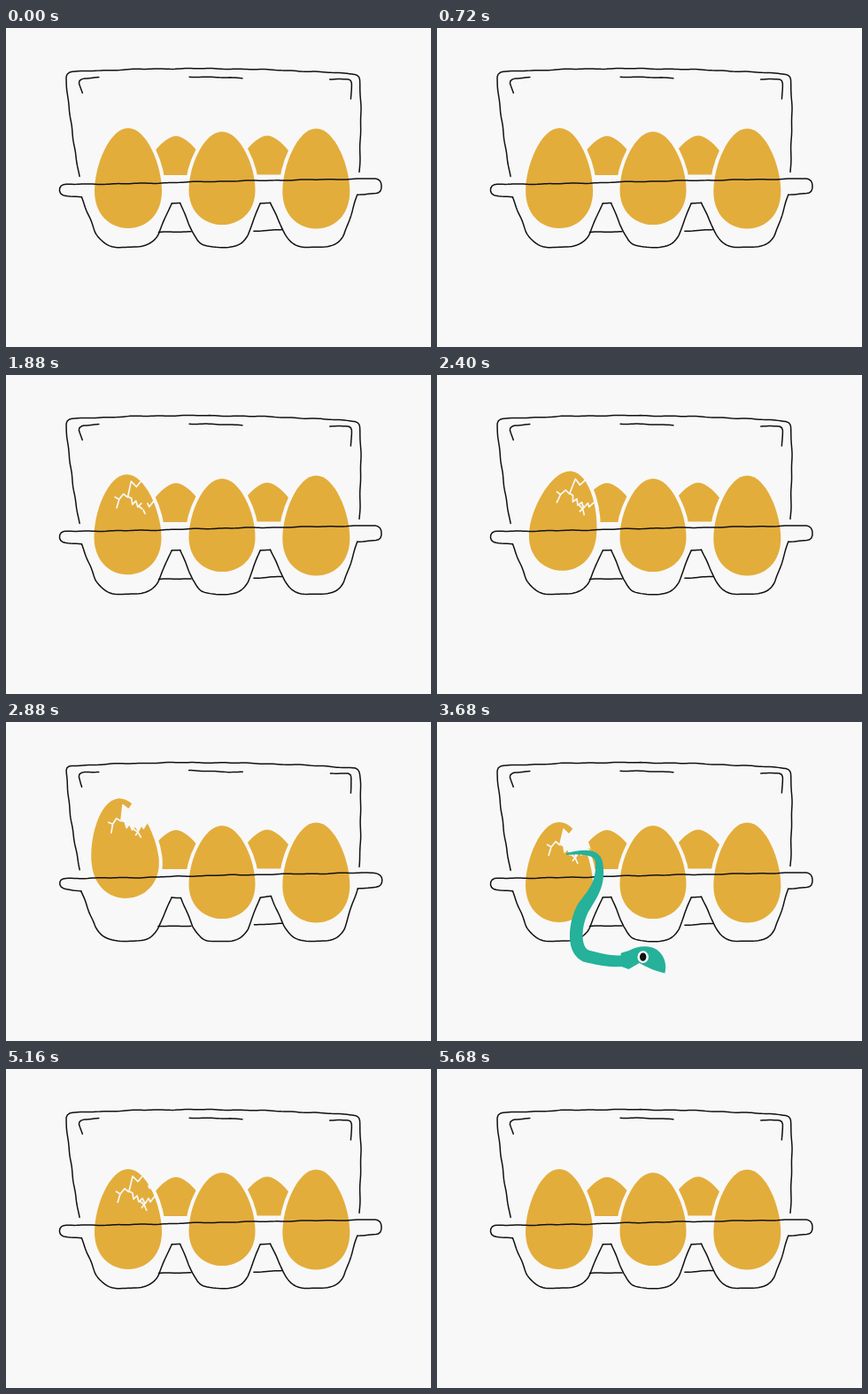
Animation, 480 px wide and 360 px high, one loop 5.76 s. Source, as an HTML page:

```html
<!DOCTYPE html>
<html lang="en">
<head>
<meta charset="utf-8">
<title>Egg carton</title>
<style>
  html, body { margin: 0; width: 100%; height: 100%; overflow: hidden; background: #f8f8f8; }
  svg { display: block; width: 100vw; height: 100vh; }
  .line { fill: none; stroke: #111; stroke-width: 1.5; stroke-linecap: round; stroke-linejoin: round; }
  .egg { fill: #e3ad3b; }
  .front { stroke: #f8f8f8; stroke-width: 8; paint-order: stroke; }
  .crack { fill: none; stroke: #f8f8f8; stroke-width: 1.7; stroke-linejoin: round; }
  .paper { fill: #f8f8f8; }
  .snake { fill: #25b19a; }
</style>
</head>
<body>
<svg viewBox="0 0 480 360">
  <defs>
    <path id="eggShape" d="M138 113C159 113 176 155 176 184C176 210 159 226 138 226C117 226 100 210 100 184C100 155 117 113 138 113Z"/>
    <path id="backShape" d="M156 166C156 150 178 122 192 122C206 122 228 150 228 166Z"/>
    <path id="route" d="M146 149C165 146 181 146 183 158C186 185 174 195 165 210C155 228 152 262 172 265C190 269 198 271 216 269C232 267 240 284 262 282S300 262 325 264S365 284 390 280S440 262 465 266S510 280 540 280H800"/>
  </defs>

  <path class="line" d="M83 167Q70 95 68 56Q68 50 74 49.5Q230 41 394 52Q399 53 399.5 58Q402 100 399 163"/>
  <path class="line" d="M105 56L88 57Q82 58 82.5 62L86 73"/>
  <path class="line" d="M207 55L267 56.5"/>
  <path class="line" d="M366 58H386Q390 58 390 63L389.5 80"/>
  <path class="line" d="M172 230.5L209 230"/>
  <path class="line" d="M280 229L312 227.5"/>

  <use href="#backShape" class="egg"/>
  <use href="#backShape" class="egg" x="103" y="-.5"/>
  <use href="#eggShape" class="egg front" transform="translate(244 117) scale(.987 .93) translate(-138 -113)"/>
  <use href="#eggShape" class="egg front" x="212.3" y=".4"/>
  <g id="hatching">
    <use href="#eggShape" class="egg front"/>
    <path id="hole" class="paper"/>
    <path id="mainCrack" class="crack" pathLength="1"/>
    <path id="sideCrack" class="crack" pathLength="1" d="M139 139L134 135L129 141L126 151M129 141L124 138"/>
    <path id="lowCrack" class="crack" pathLength="1" d="M151 149L156 153L153 157M156 153L159 160"/>
  </g>

  <path class="line" d="M85 191L68 189Q60 188 60.5 182Q61 176.5 69 176.5L150 175.5L240 173L416 170Q424 171 424.5 178Q425 186 418 186.5L397 188"/>
  <path class="line cup"/>
  <path class="line" d="M187 198H197"/>
  <path class="line cup"/>
  <path class="line" d="M287 198L299 197"/>
  <path class="line cup"/>

  <path id="chip" class="egg"/>
  <path id="body" class="snake"/>
  <g id="head">
    <path class="snake" d="M207 261L216 258C226 252 240 251 248 257C257 264 259 274 257 283C246 281 235 276 228 272L216 279L207 276Z"/>
    <ellipse cx="232" cy="265" rx="6.3" ry="6.8" class="paper"/>
    <ellipse cx="232" cy="265" rx="3.7" ry="4.7" fill="#111"/>
  </g>
</svg>
<script>
const LOOP = 5760, POSE_MS = 160, NECK = 207;
const $ = id => document.getElementById(id);
const ramp = (t, from, to) => Math.max(0, Math.min(1, (t - from) / (to - from)));
const bump = (t, from, to) => Math.sin(Math.PI * ramp(t, from, to)) ** 2;
const show = (el, on) => el.setAttribute('visibility', on ? 'visible' : 'hidden');
const transform = (el, value) => el.setAttribute('transform', value);

const cup = (x1, y1, x2, y2) => {
  const inset = (x2 - x1) * .155, mid = (x1 + x2) / 2;
  return `M${x1} ${y1}L${x1 + inset} 231C${x1 + inset * 1.6} 246 ${mid - 18} 247.5 ${mid} 247.5`
    + `S${x2 - inset * 1.5} 246 ${x2 - inset} 234L${x2} ${y2}`;
};
const cupShapes = [cup(85, 191, 187, 198), cup(197, 198, 287, 198), cup(299, 197, 397, 188)];
document.querySelectorAll('.cup').forEach((el, i) => el.setAttribute('d', cupShapes[i]));

const holeEdge = 'M154 121L149 127L143 121L139 138L143 140L144 147L148 143L150 150L154 146L157 152L161 146L163 150L170 141';
$('hole').setAttribute('d', holeEdge + 'L174 144Q169 126 156 117Z');
$('mainCrack').setAttribute('d', holeEdge);
$('chip').setAttribute('d', holeEdge + 'Q165 130 154 121Z');

// Each ink line is sampled once, then redrawn with a slight wobble in every pose.
const inkLines = [...document.querySelectorAll('.line')].map(el => {
  const length = el.getTotalLength(), steps = Math.ceil(length / 3);
  const points = Array.from({ length: steps + 1 }, (_, i) => el.getPointAtLength(length * i / steps));
  return { el, points };
});
const wobble = (x, y, pose) =>
  .25 * (Math.sin(x * .21 + y * .13 + pose * 2.1) + Math.sin(x * .09 - y * .19 + pose * 4.3));

function drawInk(pose) {
  for (const { el, points } of inkLines) {
    const moved = points.map(({ x, y }) => [x + wobble(y, x, pose), y + wobble(x, y, pose)]);
    el.setAttribute('d', 'M' + moved.join('L'));
  }
}

function drawEgg(t) {
  const shiver = 3 * Math.sin(t / 320 * 2 * Math.PI) * (bump(t, 0, 800) + bump(t, 1760, 2240));
  const tilt = shiver + 8.5 * bump(t, 2240, 2560) - 7 * bump(t, 2560, 3200);
  const lift = 46 * bump(t, 960, 1920) + 5 * bump(t, 2240, 2560) + 27 * bump(t, 2560, 3200);
  transform($('hatching'), `translate(${tilt * .72} ${-lift}) rotate(${tilt} 138 170)`);

  const growth = .8 * ramp(t, 1120, 1400) + .2 * ramp(t, 1760, 2160);
  const crack = growth * (1 - ramp(t, 5240, 5660));
  const dash = (id, visible, pattern) => {
    show($(id), visible);
    $(id).style.strokeDasharray = pattern;
  };
  const side = ramp(crack, 0, .8), low = ramp(crack, .8, 1);
  dash('mainCrack', crack > 0, `${.8 * crack} ${1 - crack} 1`);
  dash('sideCrack', side > 0, `${side} 2`);
  dash('lowCrack', low > 0, `${low} 2`);

  const open = t < 2520 ? 0 : 1 - ramp(t, 4800, 5260);
  show($('hole'), open > 0);
  transform($('hole'), `translate(166 132) scale(${open}) translate(-166 -132)`);

  const flight = (t - 2520) / 320;
  show($('chip'), flight >= 0 && flight <= 1);
  transform($('chip'), `translate(${4 + 342 * flight} ${-4 - 400 * flight + 300 * flight ** 2}) rotate(${400 * flight} 156 135)`);
}

function drawSnake(t) {
  const reach = t < 3680 ? NECK * (t - 3120) / 560 : NECK + 520 * (t - 3680) / 800;
  const visible = reach > 0 && t < 4480;
  show($('body'), visible);
  show($('head'), visible);
  if (!visible) return;

  const route = $('route'), upper = [], lower = [];
  const place = s => {
    const { x, y } = route.getPointAtLength(s);
    const a = route.getPointAtLength(Math.max(0, s - 1)), b = route.getPointAtLength(s + 1);
    return { x, y, angle: Math.atan2(b.y - a.y, b.x - a.x) };
  };
  const tail = reach - NECK, start = Math.max(0, tail), steps = 50;
  for (let i = 0; i <= steps; i++) {
    const s = start + (reach - start) * i / steps, d = s - tail;
    const half = 1 + 6.3 * Math.min(1, d / 95) ** .9 - 1.2 * ramp(d, 150, NECK);
    const { x, y, angle } = place(s);
    const nx = -Math.sin(angle) * half, ny = Math.cos(angle) * half;
    upper.push([x - nx, y - ny]);
    lower.unshift([x + nx, y + ny]);
  }
  $('body').setAttribute('d', 'M' + upper.concat(lower).join('L') + 'Z');

  const neck = place(reach), size = ramp(reach, 0, 25);
  transform($('head'), `translate(${neck.x} ${neck.y}) rotate(${neck.angle * 180 / Math.PI + 6}) scale(${size}) translate(-216 -269)`);
}

function frame() {
  const t = Math.floor(performance.now() % LOOP / 40) * 40;
  drawInk(Math.floor(t / POSE_MS) % 4);
  drawEgg(t);
  drawSnake(t);
  requestAnimationFrame(frame);
}
frame();
</script>
</body>
</html>
```
